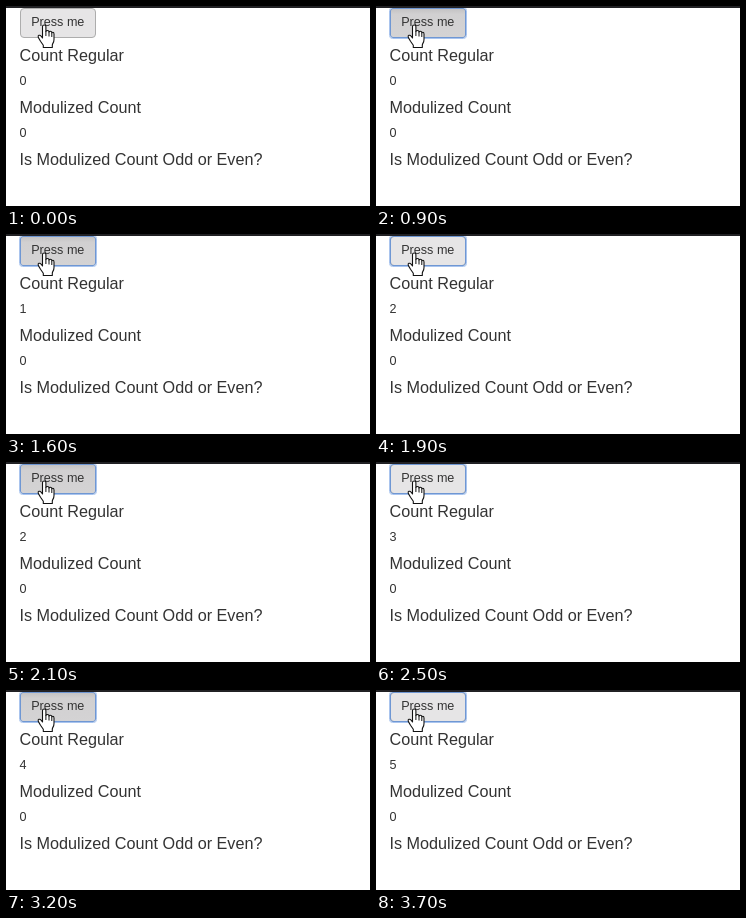
An HTML page that plays this animation: 364 px wide and 200 px high, repeating every 3.8 s.

```html
<!DOCTYPE html>
<html lang="en">
<head>
<meta charset="utf-8">
<title>Press counter</title>
<style>
  html, body { margin: 0; width: 100%; height: 100%; overflow: hidden; background: #fff; }
  svg { display: block; }
  text { font: 12.6px "Liberation Sans", Arial, sans-serif; fill: #333; }
  .head text { font-size: 16.2px; }

  .ring, .down, .count { animation: 3800ms step-end infinite; }
  .ring { animation-name: focus; }
  .down { animation-name: press; }
  .count { animation-name: count; }

  @keyframes focus {
    0% { opacity: 0; }
    23.68%, 100% { opacity: 1; }
  }
  @keyframes press {
    0%, 31.57%, 44.73%, 60.52%, 71.05%, 86.84%, 100% { opacity: 0; }
    23.68%, 39.47%, 52.63%, 68.42%, 81.57% { opacity: 1; }
  }
  @keyframes count {
    0% { transform: translateY(0); }
    34.21% { transform: translateY(-20px); }
    47.36% { transform: translateY(-40px); }
    63.15% { transform: translateY(-60px); }
    73.68% { transform: translateY(-80px); }
    89.47%, 100% { transform: translateY(-100px); }
  }
</style>
</head>
<body>
<svg width="364" height="200" viewBox="0 0 364 200">
  <defs>
    <linearGradient id="shade" x2="0" y2="1">
      <stop offset="0" stop-color="#c3c2c3"/>
      <stop offset=".2" stop-color="#d1d0d1"/>
      <stop offset="1" stop-color="#d4d3d4"/>
    </linearGradient>
  </defs>

  <!-- button -->
  <rect x="14.5" y="2.5" width="75" height="29" rx="3.5" fill="#e6e5e6" stroke="#adadad"/>
  <rect class="down" x="14.5" y="2.5" width="75" height="29" rx="3.5" fill="url(#shade)"/>
  <g class="ring" fill="none">
    <rect x="13.5" y="1.5" width="77" height="31" rx="3" stroke="#a9c4ee"/>
    <rect x="14.5" y="2.5" width="75" height="29" rx="2.5" stroke="#6f97d3"/>
  </g>
  <text x="25.2" y="20">Press me</text>
  <rect width="364" height="2" fill="#212124"/>

  <g class="head">
    <text x="13.5" y="55">Count Regular</text>
    <text x="13.5" y="107">Modulized Count</text>
    <text x="13.5" y="159">Is Modulized Count Odd or Even?</text>
  </g>

  <svg x="13" y="66" width="12" height="17">
    <g class="count">
      <text x=".5 .5 .5 .5 .5 .5" y="13 33 53 73 93 113">012345</text>
    </g>
  </svg>
  <text x="13.5" y="131">0</text>

  <!-- pointing hand -->
  <path d="M36.5 32V20.5q0-1.5 1.7-1.5t1.7 1.5V25.3q.3-.8 1.5-.8 1.6 0 1.6 1.5.4-.7 1.3-.7 1.5 0 1.5 1.5.4-.5 1-.5 1.2 0 1.2 1.6V33.5q0 2-1 3.6-.7 1.2-.7 2.2V41.5H37.3V39.3L34.5 35.2 32.3 31.4q-.6-1.6.6-2.1 1.3-.4 2.2.9Z"
        fill="#fff" stroke="#111" stroke-width="1.1" stroke-linejoin="round"/>
  <path d="M39.9 25V30M43 26V30.500M45.800 27V31" fill="none" stroke="#111"/>
</svg>
</body>
</html>
```
